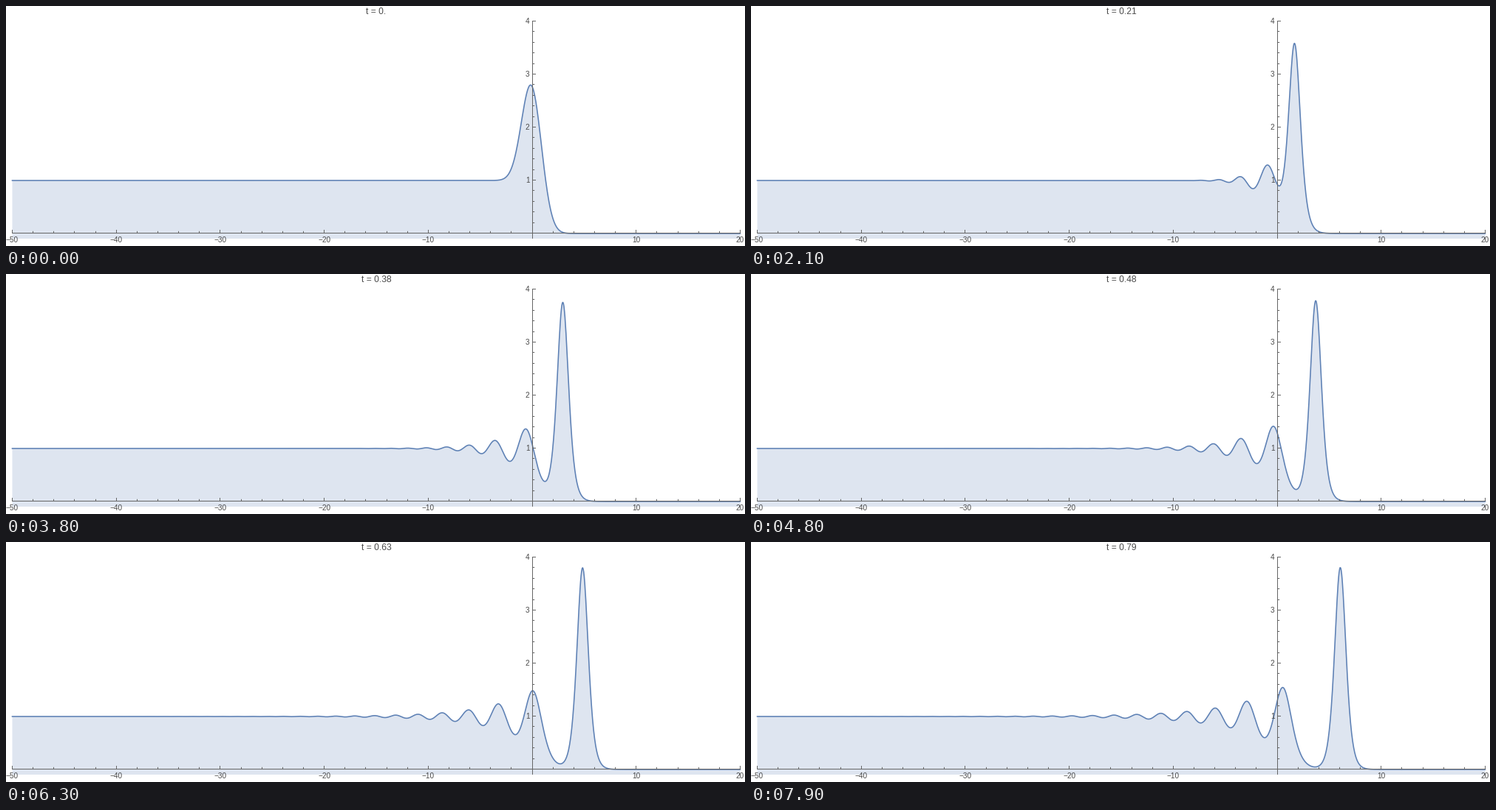
Recreate the animation shown at these times as a matplotlib script. Size 1000 by 326 pixels, loop 8000 ms.

```python
import numpy as np
import matplotlib.pyplot as plt
from matplotlib.animation import FuncAnimation
from math import erf

W, H, DPI = 1000, 326, 100
PT = 72 / DPI  # points per pixel
FRAMES, STEP_MS = 80, 100
GREY, INK, BLUE = "#666666", "#4a4a4a", "#5e81b5"
FONT = "Liberation Sans"

# plot coordinates to stage pixels
X0, Y0, SX, SY = 712.07, 309.0, 985 / 70, 72.0
AXIS_Y, BOTTOM = 308.5, 316


def px(x):
    return X0 + SX * x


def py(u):
    return Y0 - SY * u


# Korteweg-de Vries: u_t + 6 u u_x + u_xxx = 0, Fourier in space, RK4 in time
N, LEFT, SPAN = 1024, -110.0, 160.0
BUMP, WIDTH = 2.27, 0.955
FINE = 4
x = LEFT + SPAN * np.arange(N) / N
xf = LEFT + SPAN * np.arange(N * FINE) / (N * FINE)
view = (xf > -50.2) & (xf < 20.2)
k = 2 * np.pi * np.arange(N // 2 + 1) / SPAN
curve_x = np.linspace(-50, 20, 1401)


def gauss_cdf(z):
    return np.array([0.5 + 0.5 * erf(v / np.sqrt(2)) for v in z])


def slope(uh):
    return -3j * k * np.fft.rfft(np.fft.irfft(uh, N) ** 2)


def solve(substeps=20):
    dt = 0.01 / substeps
    half = np.exp(0.5j * k ** 3 * dt)
    full = half ** 2
    step = gauss_cdf(-x) * gauss_cdf((x + 90) / 3)
    uh = np.fft.rfft(step + BUMP * np.exp(-(x / WIDTH) ** 2 / 2))
    out = []
    for _ in range(FRAMES):
        fine = np.fft.irfft(uh, N * FINE) * FINE
        out.append(np.interp(curve_x, xf[view], fine[view]))
        for _ in range(substeps):
            a = dt * slope(uh)
            b = dt * slope(half * (uh + a / 2))
            c = dt * slope(half * uh + b / 2)
            d = dt * slope(full * uh + half * c)
            uh = full * uh + (full * a + 2 * half * (b + c) + d) / 6
    return out


waves = solve()

fig = plt.figure(figsize=(W / DPI, H / DPI), dpi=DPI, facecolor="white")
ax = fig.add_axes([0, 0, 1, 1])
ax.set_xlim(0, W)
ax.set_ylim(H, 0)
ax.axis("off")

area, = ax.fill([0, 1, 1], [0, 0, 1], color=BLUE, alpha=0.2, lw=0, zorder=1)
curve, = ax.plot([], [], color=BLUE, lw=1.6 * PT, zorder=2)


def stroke(x1, y1, x2, y2):
    ax.plot([x1, x2], [y1, y2], color=GREY, lw=PT, zorder=3,
            snap=False, solid_capstyle="butt")


def label(x, y, s, size, ha="center"):
    return ax.text(x, y, s, fontsize=size * PT, family=FONT, color=INK,
                   ha=ha, va="baseline", zorder=4)


def mid(v):
    return np.floor(v) + 0.5


axis_x = mid(X0)
stroke(8, AXIS_Y, 994, AXIS_Y)
stroke(axis_x, 20, axis_x, BOTTOM)

for n in range(-50, 21, 2):
    major = n % 10 == 0
    if n:
        tick = mid(px(n))
        stroke(tick, AXIS_Y, tick, AXIS_Y - (4.5 if major else 2.7))
        if major:
            label(px(n), 321, str(n).replace("-", "\u2212"), 10)

for n in range(1, 21):
    y = mid(AXIS_Y - SY * n / 5)
    major = n % 5 == 0
    stroke(axis_x, y, axis_x + (4.5 if major else 2.7), y)
    if major:
        label(708.5, y + 3.5, str(n // 5), 10, "right")

title = label(501, 11, "", 12)


def update(i):
    xs, ys = px(curve_x), py(waves[i])
    curve.set_data(xs, ys)
    area.set_xy(np.column_stack([np.r_[xs, xs[-1], xs[0]],
                                 np.r_[ys, BOTTOM, BOTTOM]]))
    title.set_text("t = " + (f"{i / 100:g}" if i else "0."))
    return area, curve, title


anim = FuncAnimation(fig, update, frames=FRAMES, interval=STEP_MS,
                     init_func=lambda: update(0), repeat=True, repeat_delay=0)
plt.show()
```
